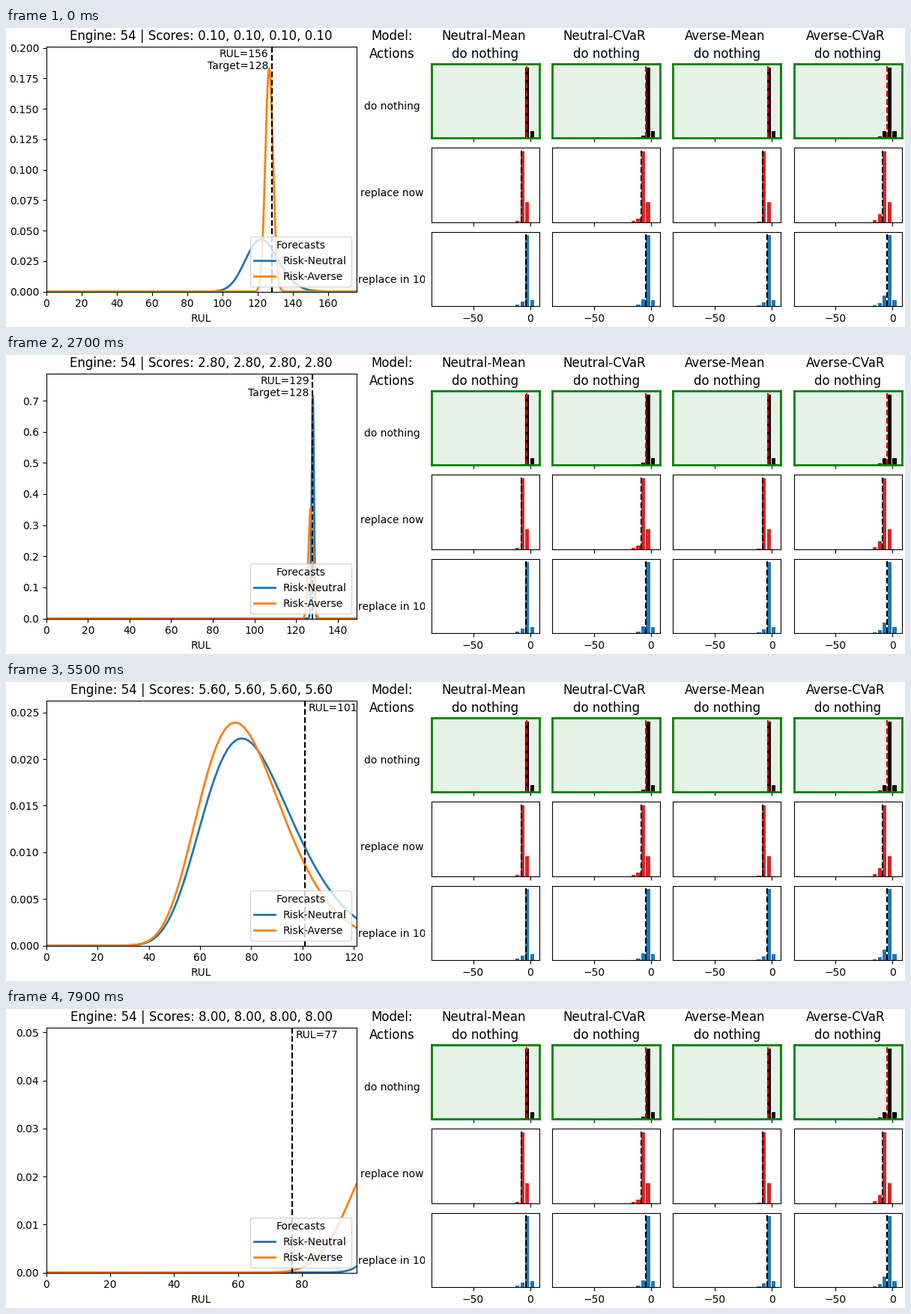
Recreate the animation shown at these times as a matplotlib script. Size 1200 by 400 pixels, loop 8000 ms.

```python
import numpy as np
import matplotlib.pyplot as plt
from matplotlib.animation import FuncAnimation

W, H, DPI = 1200, 400, 100
FRAMES, INTERVAL = 80, 100
START_RUL, TARGET, MARGIN = 156, 128, 20

plt.rcParams["font.family"] = "DejaVu Sans"
fig = plt.figure(figsize=(W / DPI, H / DPI), dpi=DPI, facecolor="white")


def add_axes(x, y, w, h):
    """Axes placed in pixels, measured from the top left corner."""
    return fig.add_axes([x / W, 1 - (y + h) / H, w / W, h / H])


def add_panel(x, w):
    """Blank white strip over the full height."""
    ax = add_axes(x, 0, w, H)
    ax.set(xlim=(x, x + w), ylim=(H, 0), xticks=[], yticks=[])
    ax.spines[:].set_visible(False)
    return ax


def put(ax, x, y, text, size=12):
    ax.text(x, y, text, size=size, ha="center", va="baseline")


# Forecast plot
main = add_axes(53.8, 24.6, 413.8, 327.9)
neutral, = main.plot([], [], color="C0", lw=2, label="Risk-Neutral")
averse, = main.plot([], [], color="C1", lw=2, label="Risk-Averse")
marker = main.axvline(TARGET, color="black", ls="--", lw=1.5)
note = main.annotate("", xy=(TARGET, 0.99), xycoords=main.get_xaxis_transform(),
                     xytext=(3.2, 0), textcoords="offset points", va="top")
main.set_xlabel("RUL")
main.legend(title="Forecasts", loc="lower right")
title = main.set_title("")

# Cost histograms: each model has a cost shift and a weight of its left tail,
# each action moves the peak and changes the shares beside it.
HEAD_Y, SUBHEAD_Y = 16.2, 39.7
BIN, BIN_CENTRE, BAR = 4.3, -2.6, 3.45
MODELS = (("Neutral-Mean", 0, 2), ("Neutral-CVaR", 0.9, 5),
          ("Averse-Mean", 0.2, 1), ("Averse-CVaR", 1.2, 11))
# name, bar colour, line colour, peak bin, right share, extra tail, mean
ACTIONS = (("do nothing", "black", "red", 0, 10, -1, -3.4),
           ("replace now", "C3", "black", -1, 28, 0, -7.5),
           ("replace in 10", "C0", "black", 0, 8.5, 4, -3.7))


def cost_bars(peak_bin, right, tail):
    """Bar centres and heights: a peak, one bar after it, a decaying tail before."""
    bins = np.arange(-4, 2)
    heights = np.where(bins < 0, tail * 0.28 ** (-bins - 1.0), 100)
    heights[bins == 1] = right
    keep = heights >= 1
    return BIN_CENTRE + BIN * (bins + peak_bin)[keep], heights[keep]


labels = add_panel(476, 83)
put(labels, 515, HEAD_Y, "Model:")
put(labels, 515, SUBHEAD_Y, "Actions")
for row, action in enumerate(ACTIONS):
    put(labels, 515, 109 + 116 * row, action[0], 10)

grid = add_panel(559, 641)
for col, (model, shift, tail) in enumerate(MODELS):
    left = 568 + 161.18 * col
    put(grid, left + 69.4, HEAD_Y, model)
    put(grid, left + 72, SUBHEAD_Y, "do nothing")
    for row, (_, fill, stroke, peak_bin, right, extra, mean) in enumerate(ACTIONS):
        ax = add_axes(left, 48 + 112.3 * row, 144, 99.4)
        ax.bar(*cost_bars(peak_bin, right, tail + extra), BAR, color=fill)
        ax.axvline(mean - shift, color=stroke, ls="--", lw=1.5)
        ax.set(xlim=(-86.4, 8), ylim=(0, 105), xticks=[-50, 0], yticks=[])
        ax.tick_params(labelbottom=row == len(ACTIONS) - 1)
        if row == 0:
            ax.set_facecolor(("green", 0.1))
            ax.spines[:].set(color="green", linewidth=2)

# Key poses: step, then mode and peak density of the neutral and averse forecast
POSES = np.array([
    (0, 122, .0428, 126.5, .183),
    (16, 107, .0286, 104.3, .0196),
    (27, 128.1, .716, 127.1, .355),
    (39, 116.2, .0302, 120.1, .046),
    (55, 76.3, .0222, 73.7, .0239),
    (64, 73.3, .0202, 62.5, .031),
    (79, 118, .0464, 109.3, .03),
])


def forecast(frame, column):
    steps, modes, peaks = POSES[:, [0, column, column + 1]].T
    mode = np.interp(frame, steps, modes)
    peak = np.exp(np.interp(frame, steps, np.log(peaks)))
    return mode, peak


def lognormal(x, mode, peak):
    c = 1 / (mode * peak * np.sqrt(2 * np.pi))
    sigma = c * np.exp(-c * c / 2)
    return peak * np.exp(-np.log(x / mode) ** 2 / (2 * sigma ** 2))


def update(frame):
    rul = START_RUL - frame
    x = np.linspace(0.01, rul + MARGIN, 1500)
    top = 0
    for line, column in ((neutral, 1), (averse, 3)):
        mode, peak = forecast(frame, column)
        line.set_data(x, lognormal(x, mode, peak))
        top = max(top, peak)
    main.set_xlim(0, rul + MARGIN)
    main.set_ylim(0, 1.1 * top)

    known = min(rul, TARGET)
    marker.set_xdata([known, known])
    note.xy = (known, 0.99)
    capped = rul > TARGET
    note.set_text(f"RUL={rul}\nTarget={TARGET}" if capped else f"RUL={rul}")
    note.set_ha("right" if capped else "left")
    note.xyann = (-3.2 if capped else 3.2, 0)

    score = f"{(frame + 1) / 10:.2f}"
    title.set_text("Engine: 54 | Scores: " + ", ".join([score] * 4))
    return neutral, averse, marker, note, title


anim = FuncAnimation(fig, update, frames=FRAMES, interval=INTERVAL,
                     init_func=lambda: update(0), repeat=True, repeat_delay=0)
plt.show()
```
